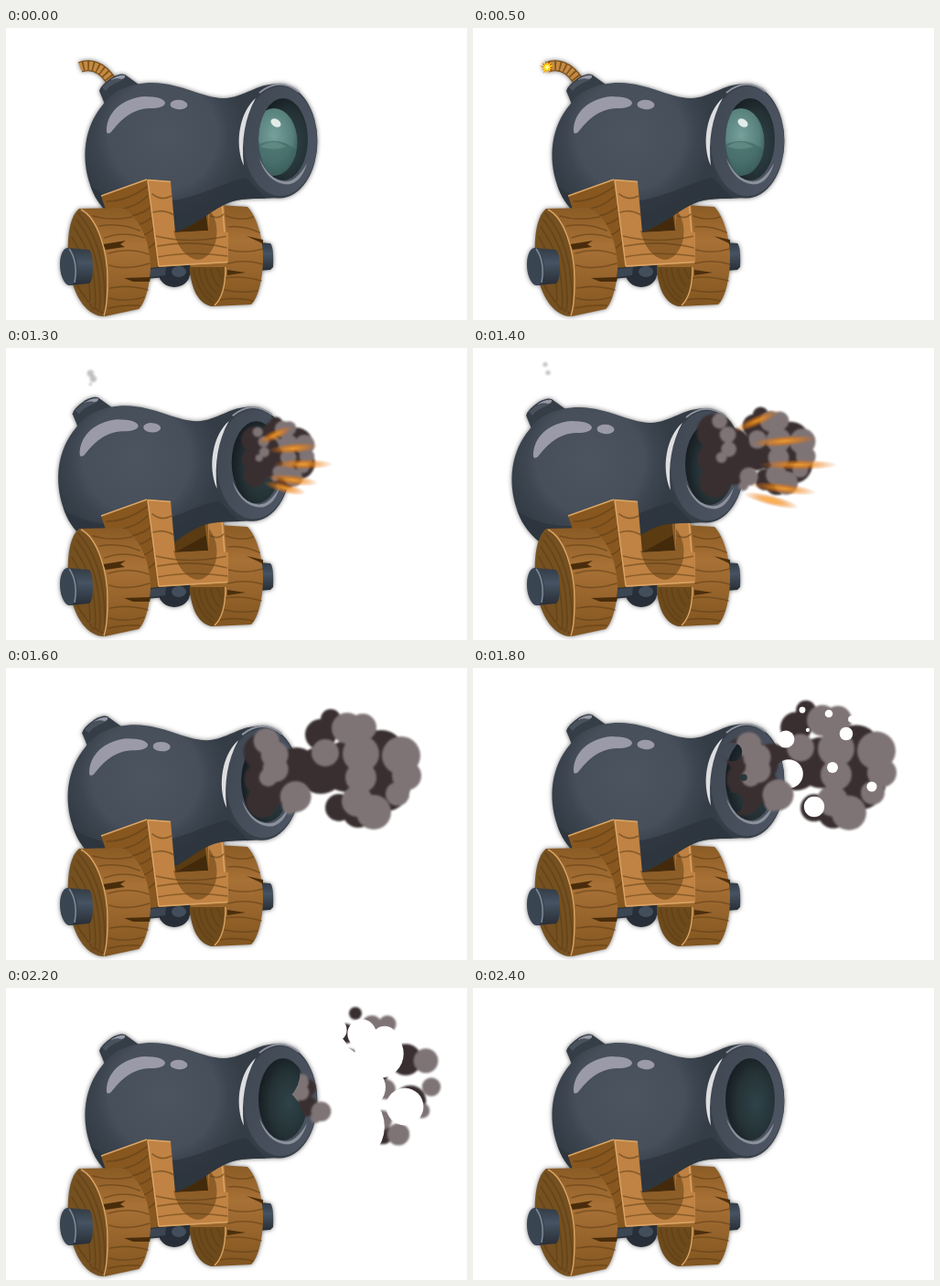
Animation, 504 px wide and 320 px high, one loop 2.9 s. Source, as an HTML page:

```html
<!DOCTYPE html>
<html lang="en">
<head>
<meta charset="utf-8">
<title>Cannon</title>
<style>
  html, body { margin: 0; width: 100%; height: 100%; overflow: hidden; background: #fff; }
  svg { display: block; width: 100vw; height: 100vh; }
  .cannon { filter: drop-shadow(0 0 2.5px rgba(0, 0, 0, .55)); }
  .grain { fill: none; stroke: #5d3c14; stroke-width: 1.7; stroke-linecap: round; opacity: .55; }
  .edge { fill: none; stroke: #dba565; stroke-width: 1.4; }
  .smoke { filter: blur(.9px); }
  .dark { fill: #3a2f30; }
  .light { fill: #7f7475; }
</style>
</head>
<body>
<svg viewBox="0 0 504 320" xmlns="http://www.w3.org/2000/svg">
  <defs>
    <radialGradient id="iron" gradientUnits="userSpaceOnUse" cx="172" cy="118" r="92">
      <stop offset="0" stop-color="#4b545f"/><stop offset=".64" stop-color="#464f5a"/>
      <stop offset=".78" stop-color="#3d4650"/><stop offset="1" stop-color="#343c46"/>
    </radialGradient>
    <linearGradient id="face" x2="1" y2=".5">
      <stop offset="0" stop-color="#3f4752"/><stop offset="1" stop-color="#4c5462"/>
    </linearGradient>
    <radialGradient id="bore" cx=".62" cy=".55" r=".62">
      <stop offset="0" stop-color="#2f4349"/><stop offset=".6" stop-color="#253337"/><stop offset="1" stop-color="#171e22"/>
    </radialGradient>
    <radialGradient id="glass" cx=".5" cy=".4" r=".6">
      <stop offset="0" stop-color="#76a09b"/><stop offset=".65" stop-color="#58817d"/><stop offset="1" stop-color="#365654"/>
    </radialGradient>
    <linearGradient id="tread" x2="0" y2="1">
      <stop offset="0" stop-color="#8a5b25"/><stop offset=".35" stop-color="#a87136"/><stop offset="1" stop-color="#825520"/>
    </linearGradient>
    <linearGradient id="hub" x2="0" y2="1">
      <stop offset="0" stop-color="#333c47"/><stop offset=".4" stop-color="#465362"/><stop offset="1" stop-color="#272d36"/>
    </linearGradient>
    <radialGradient id="fire">
      <stop offset="0" stop-color="#ffa326"/><stop offset=".4" stop-color="#f08614" stop-opacity=".75"/>
      <stop offset="1" stop-color="#e86a08" stop-opacity="0"/>
    </radialGradient>
    <clipPath id="inBore"><ellipse cx="303" cy="122" rx="27" ry="45"/></clipPath>
    <clipPath id="inFront"><path d="M154 166L180 168L185 224L221 222L221 190H238L243 257L167 262Z"/></clipPath>
    <path id="fusePath" d="M81 43C91 39 104 41 115 58"/>
    <mask id="unburnt" maskUnits="userSpaceOnUse" x="0" y="0" width="504" height="320">
      <use id="rest" href="#fusePath" fill="none" stroke="#fff" stroke-width="16"/>
    </mask>
    <mask id="nearMask" maskUnits="userSpaceOnUse" x="0" y="0" width="504" height="320">
      <rect width="504" height="320" fill="#fff"/><g id="nearBites"/>
    </mask>
    <mask id="farMask" maskUnits="userSpaceOnUse" x="0" y="0" width="504" height="320">
      <rect width="504" height="320" fill="#fff"/><g id="farBites"/>
    </mask>
  </defs>

  <g class="cannon">
    <!-- axle and rear wheel -->
    <path fill="url(#hub)" d="M276 235L289 236Q293 240 292 262L289 265L276 266Z"/>
    <path fill="#29313b" d="M152 261L228 256V268L196 271L152 275Z"/>
    <ellipse cx="184" cy="269" rx="17" ry="15" fill="#272e37"/>
    <ellipse cx="189" cy="267" rx="8" ry="6" fill="#434e5c"/>
    <path fill="#3c4653" d="M158 264L175 262L174 271L158 273ZM204 262L224 260V267L206 269Z"/>
    <path fill="url(#tread)" d="M232 194L264 196C274 206 281 230 281 252C281 276 275 297 268 303L226 305C210 303 202 284 201 262Z"/>
    <path fill="#6d4a1b" d="M201 262H239C241 282 236 300 226 305C210 303 202 285 201 262Z"/>
    <g class="grain">
      <path d="M241 206Q258 212 270 207M243 218Q259 216 277 224M243 243Q262 248 281 242M243 258Q262 253 281 259M240 274Q257 271 279 277M238 287Q257 291 275 288M234 298Q252 295 270 299M205 264Q209 289 225 300M211 264Q213 286 227 296M217 264Q219 282 230 290M224 264Q226 276 233 283M231 264L236 274"/>
    </g>
    <path fill="#4b2f0d" d="M281 232L263 228L278 235L281 237ZM242 265L262 268L242 271Z"/>
    <path class="edge" d="M240 262Q240 293 228 304"/>

    <!-- carriage, rear parts -->
    <path fill="#5a3b12" d="M182 188L222 190V224H184Z"/>
    <path fill="#432a0b" d="M185 224L221 204V222Z"/>
    <path fill="#8a5c26" d="M217 190H223V222H221Z"/>
    <path fill="#bd8142" d="M221 190H238L243 257L221 240Z"/>
    <path class="edge" d="M236 190L241 248"/>

    <g id="barrel">
      <g id="fuse" mask="url(#unburnt)" fill="none">
        <use href="#fusePath" stroke="#79501d" stroke-width="12"/>
        <use href="#fusePath" stroke="#c48a46" stroke-width="9.5"/>
        <use href="#fusePath" stroke="#835619" stroke-width="11" stroke-dasharray="1.8 3.6" stroke-dashoffset="-3"/>
      </g>
      <g id="spark">
        <path id="rays" fill="#f26a0a"/><path id="star" fill="#ffe81a"/><circle id="core" fill="#fffbc8"/>
      </g>
      <path fill="#353d47" d="M109 86L102 69Q103 63 116 54Q125 49 130 51L148 64Z"/>
      <path fill="#48515c" d="M105 65Q118 51 130 52Q131 56 123 59Q113 63 109 69Z"/>
      <path fill="#9698a5" d="M114 57Q123 51 130 52Q131 55 126 56Q121 54 114 57Z"/>
      <path fill="url(#iron)" d="M106 84C116 69 136 60 160 60C194 61 212 76 238 77C262 76 272 61 299 61L300 186C270 188 254 185 238 194C222 202 206 217 184 224H150C121 216 100 197 92 172C82 142 85 109 106 84Z"/>
      <path fill="#2b323b" opacity=".7" d="M92 172C104 186 140 193 175 190C208 187 235 170 262 164L284 187C262 186 248 189 238 194C222 202 206 217 184 224H150C121 216 100 197 92 172Z"/>
      <path fill="#9b9aa8" d="M110 114C109 94 126 77 151 75Q172 75 174 82Q173 88 157 88C137 89 126 100 115 114Q111 117 110 114Z"/>
      <ellipse cx="189" cy="84" rx="9.5" ry="5.2" fill="#9b9aa8" transform="rotate(3 189 84)"/>
      <ellipse cx="299" cy="124" rx="41.5" ry="62.5" fill="#363e48"/>
      <ellipse cx="300" cy="124" rx="40" ry="60" fill="url(#face)"/>
      <path fill="#dedee0" d="M273 77C256 91 249 126 260 151C257 124 261 98 273 77Z"/>
      <path fill="none" stroke="#8d929d" stroke-width="2" d="M277 71Q299 53 320 70"/>
      <path fill="#8b919b" d="M277 143C283 164 298 173 311 171Q324 167 329 148Q317 170 304 168Q288 166 277 143Z"/>
      <ellipse cx="303" cy="122" rx="27" ry="45" fill="url(#bore)"/>
      <g id="ball" clip-path="url(#inBore)">
        <ellipse cx="293" cy="125" rx="25.5" ry="37" fill="url(#glass)"/>
        <path fill="#3f6461" opacity=".6" d="M268 132Q294 115 317 133Q312 158 293 162Q272 160 268 132Z"/>
        <path fill="#6c9590" opacity=".6" d="M278 130Q292 120 306 130Q292 135 278 130Z"/>
        <ellipse cx="295" cy="104" rx="6" ry="4" fill="#e2ebe8" transform="rotate(32 295 104)"/>
      </g>
    </g>

    <!-- carriage, front parts -->
    <path fill="#87571f" d="M104 184L154 166L167 262L156 263Q130 220 112 208Z"/>
    <g class="grain"><path d="M110 190Q132 190 154 174M117 198Q138 200 155 184M126 206Q143 208 157 197M136 216Q148 217 159 208M145 228Q153 228 161 220M152 243Q158 241 163 235"/></g>
    <path class="edge" d="M104 184L154 166"/>
    <path fill="#c08343" d="M154 166L180 168L185 224L221 222L243 224V257L167 262Z"/>
    <g clip-path="url(#inFront)">
      <path fill="#5c3a0e" opacity=".5" d="M183 222L221 222L222 198Q234 214 229 235Q222 254 209 254Q190 250 183 222Z"/>
      <g class="grain"><path d="M160 182Q170 190 181 184M161 202Q172 198 184 205M164 228Q200 237 242 228M166 239Q203 232 242 241M166 251Q200 244 243 250M224 206Q232 210 238 204"/></g>
    </g>
    <path class="edge" d="M155 167L167 261M155 166.500L180 168.500M167 261L242 256.500"/>

    <!-- front wheel -->
    <path fill="url(#tread)" d="M80 198L127 197C148 207 158 238 158 264C157 285 151 303 145 308L108 316L92 280Z"/>
    <path fill="#755020" d="M80 198C98 202 111 242 111 276Q111 304 107 316C90 316 75 297 70 268C65 239 68 207 80 198Z"/>
    <g class="grain">
      <path d="M79 203Q103 230 107 276T104 311M77 210Q99 238 102 279T98 307M74 218Q94 246 97 283T92 302M72 229Q88 255 91 283T86 294M77 280Q82 290 90 300"/>
      <path d="M95 206Q115 212 138 207M102 217Q125 213 146 222M108 230Q128 222 151 230M112 247Q134 240 156 248M113 260Q130 266 157 258M114 285Q133 281 155 287M113 296Q131 301 151 295M112 307Q129 303 146 304"/>
    </g>
    <path fill="#492d0b" d="M106 237L131 233L125 237L130 240L109 243ZM158 273L129 274L139 278L157 278Z"/>
    <path class="edge" d="M82 199C100 208 111 244 111 276Q111 304 107 315"/>
    <path fill="url(#hub)" d="M67 241L91 243Q95 247 95 262Q95 277 91 280L70 282Z"/>
    <ellipse cx="68.500" cy="261.500" rx="9.500" ry="20.500" fill="#3a4552" transform="rotate(-4 68 261)"/>
    <path fill="none" stroke="#7f8b99" stroke-width="1.5" d="M69 242Q79 256 75 279"/>
  </g>

  <g id="wisps" class="smoke" fill="#8a8888"/>
  <g id="smoke">
    <g mask="url(#farMask)"><g class="smoke"><g id="farDark" class="dark"/><g id="farLight" class="light"/></g></g>
    <g mask="url(#nearMask)"><g class="smoke"><g id="nearDark" class="dark"/><g id="nearLight" class="light"/></g></g>
  </g>
  <g id="streaks" fill="url(#fire)"/>
</svg>

<script>
const $ = id => document.getElementById(id);
const set = (el, attrs) => { for (const k in attrs) el.setAttribute(k, attrs[k]); };
const ramp = (t, a, b) => Math.max(0, Math.min(1, (t - a) / (b - a)));
const rnd = n => { const v = Math.sin(n * 127.1 + 3.7) * 43758.5453; return v - Math.floor(v); };
const add = (parent, tag) =>
  $(parent).appendChild(document.createElementNS("http://www.w3.org/2000/svg", tag));
const build = (list, parent, tag = "circle") => list.map(p => ({ p, el: add(parent, tag) }));

// Circles as [x, y, radius]: "near" puffs stay at the muzzle, "far" ones fly off, bites eat them away.
const nearDark = build([[291, 92, 20], [290, 122, 18], [291, 147, 17], [312, 104, 16], [312, 132, 18]], "nearDark");
const nearLight = build([[296, 80, 14], [305, 95, 15], [306, 111, 14], [298, 120, 10], [328, 141, 17], [322, 151, 9]], "nearLight");
const farDark = build([[318, 108, 21], [344, 112, 26], [344, 73, 17], [355, 56, 11], [364, 153, 15],
  [372, 108, 28], [385, 158, 17], [410, 95, 27], [415, 130, 27]], "farDark");
const farLight = build([[349, 93, 15], [373, 66, 17], [390, 65, 15], [388, 94, 20], [388, 120, 17],
  [384, 146, 17], [402, 158, 19], [432, 96, 21], [438, 118, 16], [428, 138, 13]], "farLight");
const bites = [
  ...build([[284, 92, 24], [284, 148, 27], [296, 120, 9]], "nearBites"),
  ...build([[408, 72, 17], [414, 56, 9], [393, 109, 14], [436, 130, 13], [389, 50, 10], [345, 116, 37],
    [373, 152, 26], [342, 78, 22], [360, 46, 8], [366, 68, 5]], "farBites")
];
// Streaks as [x, y, angle, half length].
const streaks = build([[310, 80, -24, 27], [340, 102, -5, 36], [356, 128, 0, 43],
  [339, 154, 7, 37], [326, 167, 14, 31]], "streaks", "ellipse");
const wisps = [0, 1, 2].map(() => add("wisps", "circle"));
const fuse = $("fusePath"), fuseLength = fuse.getTotalLength();

function burst(x, y, r, points, seed) {
  let d = "";
  for (let i = 0; i < points * 2; i++) {
    const a = i * Math.PI / points + seed;
    const len = i % 2 ? r * .38 : r * (.68 + .32 * rnd(seed * 9 + i));
    d += (i ? "L" : "M") + (x + len * Math.cos(a)).toFixed(1) + " " + (y + len * Math.sin(a)).toFixed(1);
  }
  return d + "Z";
}

function drawFuse(t) {
  const burnt = ramp(t, 500, 1000) * .86 * fuseLength;
  const lit = t >= 500 && t < 1100;
  set($("fuse"), { visibility: t < 1100 ? "visible" : "hidden" });
  set($("rest"), { "stroke-dasharray": `0 ${burnt} 200` });
  set($("spark"), { visibility: lit ? "visible" : "hidden" });
  if (!lit) return;
  const { x, y } = fuse.getPointAtLength(burnt), seed = t / 100;
  const r = t < 600 ? 8.5 : 17 + 3 * rnd(seed);
  set($("rays"), { d: burst(x, y, r, 11, seed) });
  set($("star"), { d: burst(x, y, r * .92, 10, seed + .35) });
  set($("core"), { cx: x, cy: y, r: r * .2 });
}

function drawSmoke(t, dx) {
  set($("smoke"), { visibility: t >= 1100 && t < 2400 ? "visible" : "hidden" });
  const out = Math.pow(ramp(t, 1050, 1600), 1.15), rise = Math.pow(out, .6);
  const fill = ramp(t, 1050, 1400), grow = ramp(t, 1100, 1600);
  const drift = Math.max(0, (t - 1600) / 400);
  const fade = 1 - Math.pow(ramp(t, 1900, 2400), 2);

  const near = (list, size) => list.forEach(({ p: [x, y, r], el }) => set(el, {
    cx: 285 + (x - 285) * fill + .6 * dx + 11 * drift,
    cy: 122 + (y - 122) * fill * (1 - .2 * drift),
    r: r * size * fade
  }));
  const far = (list, size) => list.forEach(({ p: [x, y, r], el }) => set(el, {
    cx: 255 + (x - 255) * out + 18 * drift,
    cy: 120 + (y - 120) * rise * (1 + .2 * drift) - 6 * drift,
    r: r * size * fade
  }));
  near(nearDark, fill);
  near(nearLight, grow);
  far(farDark, .45 + .55 * out);
  far(farLight, .2 + .8 * out);

  const open = Math.max(0, (t - 1650) / 350);
  for (const { p: [cx, cy, r], el } of bites) set(el, { cx, cy, r: r * open });
}

function drawStreaks(t) {
  const go = Math.max(0, (t - 1100) / 300);
  set($("streaks"), { opacity: t < 1100 ? 0 : .85 * (1 - ramp(t, 1400, 1600)) });
  for (const { p: [x, y, angle, len], el } of streaks) {
    const cx = 262 + (x - 262) * go, cy = 126 + (y - 126) * go;
    set(el, { cx, cy, rx: len * Math.min(1, .3 + .7 * go), ry: 6, transform: `rotate(${angle} ${cx} ${cy})` });
  }
}

function drawWisps(t, dx, dy) {
  const rise = (t - 1100) / 300;
  set($("wisps"), { visibility: t >= 1100 && t < 1500 ? "visible" : "hidden", transform: `translate(${dx} ${dy})` });
  wisps.forEach((el, i) => set(el, {
    cx: 119 + 4 * rise + 3 * (i % 2), cy: 47 - 34 * rise + 9 * i * rise,
    r: Math.max(0, i < 2 ? 6 - 3.4 * rise : 5 - 5 * rise), opacity: .5
  }));
}

function draw(t) {
  const kick = t < 1400 ? ramp(t, 1100, 1400) : 1 - ramp(t, 1400, 1750);
  const dx = -44 * kick, dy = 5 * kick;
  set($("barrel"), { transform: `translate(${dx} ${dy})` });
  set($("ball"), { visibility: t < 1100 ? "visible" : "hidden" });
  drawFuse(t);
  drawSmoke(t, dx);
  drawStreaks(t);
  drawWisps(t, dx, dy);
}

// Ten poses a second, with a rest at both ends of the loop.
function tick() {
  const t = performance.now() % 2900;
  draw(t < 500 ? 0 : Math.min(2400, Math.floor(t / 100) * 100));
  requestAnimationFrame(tick);
}
tick();
</script>
</body>
</html>
```
